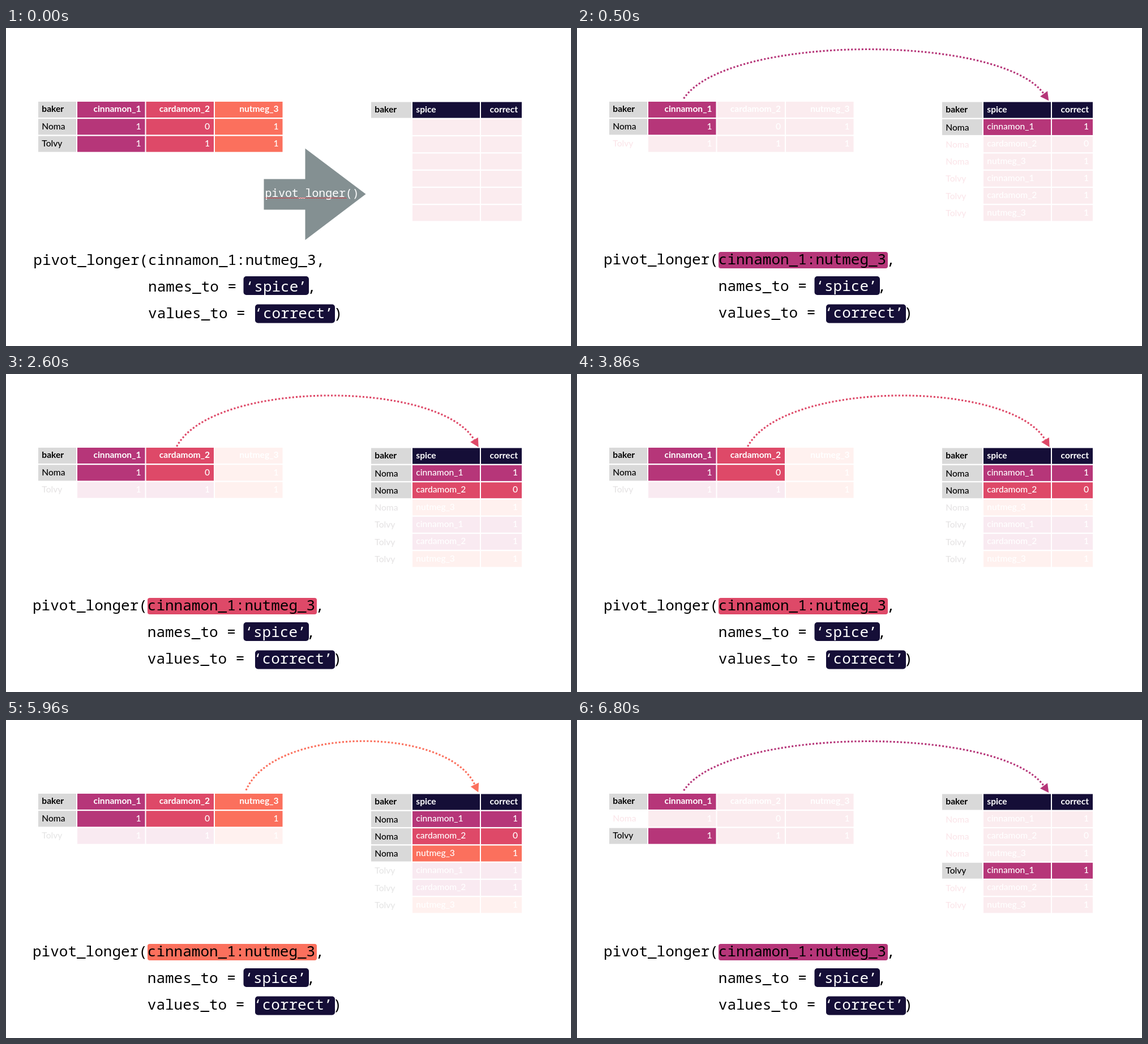
Recreate the animation shown at these times as an HTML page. Size 998x561 px, loop 8 s.

```html
<!DOCTYPE html>
<html lang="en">
<head>
<meta charset="utf-8">
<title>Pivoting a table longer</title>
<style>
  html, body { margin: 0; width: 100%; height: 100%; overflow: hidden; background: #fff; }
  svg { display: block; width: 998px; height: 561px; }
  text { font: 500 15.6px Lato, sans-serif; }
  .bold { font-weight: bold; }
  .end { text-anchor: end; }
  .code { font: 26px "Noto Sans Mono", monospace; }
  .small { font-size: 19.8px; }
</style>
</head>
<body>
<svg id="stage" viewBox="0 0 998 561"></svg>
<script>
const stage = document.getElementById('stage');
const LOOP = 8000;
const NAVY = '#150e37', GREY = '#d9d9d9';
const COLORS = ['#b63679', '#de4968', '#fb705d'];
const SPICES = ['cinnamon_1', 'cardamom_2', 'nutmeg_3'];
const BAKERS = ['Noma', 'Tolvy'];
const VALUES = [[1, 0, 1], [1, 1, 1]];
const PINK = Array(3).fill('#fbecef');
const TINTS = ['#f9eaf1', '#f9eaf1', '#fff1ef'];

// Columns as [left, width]
const WIDE = [[126, 119.5], [247.5, 119.5], [369, 119.5]];
const SPICE = [718, 119], CORRECT = [839, 72];

// Each arc: start x, start y, end x, end y
const ARCS = [[188.5, 124.5, 824.5, 116], [301.5, 128, 827, 116], [424, 124, 828, 114]];

// row: baker being moved, count: columns moved so far
const SCENES = [
  { at: 0, row: -1, count: 3, pale: PINK },
  { at: 500, row: 0, count: 1, pale: PINK, ghost: '#fbe6ea' },
  { at: 2600, row: 0, count: 2, pale: TINTS, ghost: '#e6e4e5' },
  { at: 4700, row: 0, count: 3, pale: TINTS, ghost: '#e6e6e6' },
  { at: 6800, row: 1, count: 1, pale: PINK, ghost: '#fbe6ea' }
];

const rect = (x, y, w, h, fill, r = 0) =>
  `<rect x="${x}" y="${y}" width="${w}" height="${h}" rx="${r}" fill="${fill}"/>`;
const text = (x, y, str, fill, cls = '') =>
  `<text x="${x}" y="${y}" fill="${fill}" class="${cls}">${str}</text>`;

function cell([x, w], y, str, fill, ink = '#fff', cls = '', base = 18.2) {
  const tx = cls.includes('end') ? x + w - 7 : x + 6.3;
  return rect(x, y, w, 28, fill) + text(tx, y + base, str, ink, cls);
}

function wideTable({ row, count, pale, ghost }) {
  const y = i => 130 + i * 30.3;
  let out = cell([57, 67], y(0), 'baker', GREY, '#000', 'bold');
  SPICES.forEach((s, c) =>
    out += cell(WIDE[c], y(0), s, c < count ? COLORS[c] : pale[c], '#fff', 'bold end'));
  BAKERS.forEach((name, r) => {
    const on = row < 0 || row === r;
    out += cell([57, 67], y(r + 1), name, on ? GREY : '#fff', on ? '#000' : ghost);
    VALUES[r].forEach((v, c) =>
      out += cell(WIDE[c], y(r + 1), v, on && c < count ? COLORS[c] : pale[c], '#fff', 'end'));
  });
  return out;
}

function longTable({ row, count, pale, ghost }) {
  const y = i => 130.6 + i * 30.3;
  let out = cell([645, 70.7], y(0), 'baker', GREY, '#000', 'bold')
    + cell(SPICE, y(0), 'spice', NAVY, '#fff', 'bold')
    + cell(CORRECT, y(0), 'correct', NAVY, '#fff', 'bold end');
  for (let i = 0; i < 6; i++) {
    const r = Math.floor(i / 3), c = i % 3, top = y(i + 1);
    const filled = row >= 0, on = row === r && c < count;
    const fill = on ? COLORS[c] : pale[c];
    if (filled) out += cell([645, 70.7], top, BAKERS[r], on ? GREY : '#fff', on ? '#000' : ghost, '', 19.6);
    out += cell(SPICE, top, filled ? SPICES[c] : '', fill);
    out += cell(CORRECT, top, filled ? VALUES[r][c] : '', fill, '#fff', 'end');
  }
  return out;
}

function bigArrow() {
  let wave = 'M457.5 300';
  for (let i = 0; i < 36; i++) wave += 'q1 -2 2 0t2 0';
  return '<path d="M455.5 266.5H528.5V212.5L635.5 293L528.5 374V320.5H455.5Z" fill="#849092"/>'
    + text(457.4, 298.2, 'pivot_longer()', '#fff', 'code small')
    + `<path d="${wave}" fill="none" stroke="#e0303a"/>`;
}

function arc(i) {
  const [x0, y0, x1, y1] = ARCS[i], color = COLORS[i];
  const bend = (x1 - x0) * 0.12;
  const angle = Math.atan2(y1 - 10, bend) * 180 / Math.PI;
  return `<path d="M${x0} ${y0}C${x0 + bend} 10 ${x1 - bend} 10 ${x1} ${y1}" fill="none"
      stroke="${color}" stroke-width="3.1" stroke-dasharray="3.1"/>
    <path d="M0 -8L15 0L0 8Z" fill="${color}" transform="translate(${x1} ${y1}) rotate(${angle})"/>`;
}

function codeBlock({ row, count }) {
  const moving = row >= 0;
  const left = moving ? 47 : 48.3, base = moving ? 417 : 418;
  const code = (col, line, str, fill = '#000') =>
    text(left + col * 15.6, base + line * 46.9, str, fill, 'code');
  return (moving ? rect(250, 395, 299, 29, COLORS[count - 1], 4) : '')
    + rect(419.5, 438, 115.5, 33, NAVY, 5)
    + rect(440, 487.5, 141, 33, NAVY, 5)
    + code(0, 0, 'pivot_longer(cinnamon_1:nutmeg_3,')
    + code(13, 1, 'names_to =') + code(24, 1, '‘spice’', '#fff') + code(31, 1, ',')
    + code(13, 2, 'values_to =') + code(25, 2, '‘correct’', '#fff') + code(34, 2, ')');
}

let shown;
function frame() {
  const t = performance.now() % LOOP;
  const scene = SCENES.findLast(s => t >= s.at);
  if (scene !== shown) {
    shown = scene;
    stage.innerHTML = wideTable(scene) + longTable(scene)
      + (scene.row < 0 ? bigArrow() : arc(scene.count - 1)) + codeBlock(scene);
  }
  requestAnimationFrame(frame);
}
frame();
</script>
</body>
</html>
```
